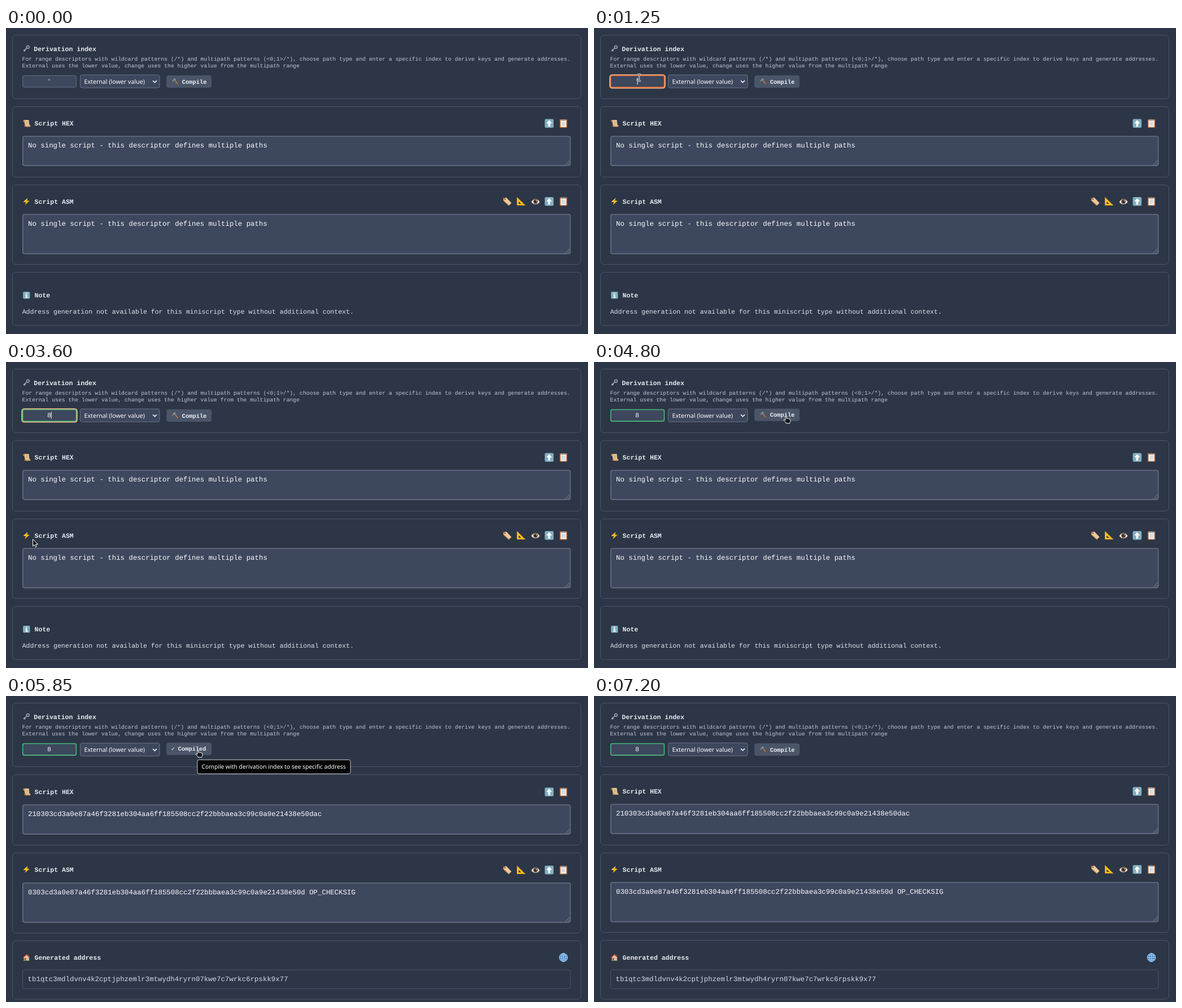
Recreate the animation shown at these times as an HTML page. Size 1031 by 543 pixels, loop 7800 ms.

```html
<!DOCTYPE html>
<html lang="en">
<head>
<meta charset="utf-8">
<title>Derivation index</title>
<style>
html, body { margin: 0; width: 100%; height: 100%; overflow: hidden; background: #2c3646; }
svg.stage { display: block; width: 1031px; height: 543px; }
text { font-family: "Liberation Mono", monospace; text-rendering: geometricPrecision; white-space: pre; }
.panel { fill: none; stroke: #4a5568; }
.area { fill: #3d475d; stroke: #667084; stroke-width: 1.6; }
.title { font-size: 11.53px; font-weight: bold; fill: #e6ebf1; }
.hint { font-size: 9.75px; fill: #bcc7d5; }
.code { font-size: 12.4px; fill: #fbfcfe; }
.note { font-size: 11.53px; fill: #dde4ec; }
.btn { font-size: 10.4px; font-weight: bold; fill: #eef2f7; }
.sans { font-family: "Noto Sans", "Open Sans", sans-serif; fill: #fff; }
.grip { fill: none; stroke: #8e98a8; stroke-width: .8; }
</style>
</head>
<body>
<svg class="stage" viewBox="0 0 1031 543">
<defs>
  <symbol id="key" viewBox="0 0 16 16" fill="none" stroke="#aab7c1">
    <circle cx="11.5" cy="4.6" r="3" stroke-width="1.6"/>
    <path d="M9.2 6.8 2 13.6M2.2 10.8l3.3 3.4M4.3 9.4l2.4 2.4" stroke-width="1.5"/>
  </symbol>
  <symbol id="hammer" viewBox="0 0 16 16">
    <path d="M6 5.5 8 3.8 15.4 13.3 13.4 15z" fill="#b5703f"/>
    <path d="M1 7.4 7.2.8 10.4 3.6 8.3 6 6.6 5 3.2 9.4z" fill="#82909a"/>
    <path d="M1 7.4 3.2 9.4 4.2 8.1 2 6.2z" fill="#566670"/>
  </symbol>
  <symbol id="scroll" viewBox="0 0 16 16">
    <path d="M2.2 1h10.2l1.3 11.5H4.6z" fill="#f2cf9f"/>
    <path d="M2.4 1a2 2 0 0 0-.4 4h2L4.3 2.5z" fill="#c98f59"/>
    <path d="M4.2 11.5h10.3a1.8 1.8 0 0 1 0 3.6H5.4z" fill="#ddb07a"/>
    <circle cx="4.6" cy="13.3" r="1.8" fill="#b97f4b"/>
    <path d="M5.4 4.2h6M5.7 6.5h6M6 8.8h6" stroke="#b58655" stroke-width=".9"/>
  </symbol>
  <symbol id="bolt" viewBox="0 0 16 16">
    <path d="M10.8.6 1.5 9l5.2.4L4.6 15.4 14.5 6.8 9 6.2z" fill="#fcb911"/>
    <path d="M10.8.6 1.5 9l1.6.1z" fill="#ffdf68"/>
  </symbol>
  <symbol id="up" viewBox="0 0 16 16">
    <rect x=".4" y=".4" width="15.2" height="15.2" rx="2.2" fill="#82aec0"/>
    <path d="M8 2.2 13 8H9.8v5.6H6.2V8H3z" fill="#fafcfd"/>
  </symbol>
  <symbol id="info" viewBox="0 0 16 16">
    <rect x=".4" y=".4" width="15.2" height="15.2" rx="2.2" fill="#82aec0"/>
    <circle cx="8" cy="3.8" r="1.5" fill="#fff"/>
    <path d="M5.8 6.4h3.5v5.4h1.5v1.7H5.4v-1.7h1.5V8.1H5.8z" fill="#fff"/>
  </symbol>
  <symbol id="clip" viewBox="0 0 16 16">
    <rect x="1.8" y="1.4" width="12.4" height="14.2" rx="1.3" fill="#bd7549"/>
    <path d="M3.4 3.2h9.2v11H3.4z" fill="#f6f7f8"/>
    <path d="M5 3.9V2.2h1.6a1.5 1.5 0 0 1 2.8 0H11v1.7z" fill="#8f9ea7"/>
    <path d="M5 6.7h6M5 8.9h6M5 11.1h6" stroke="#a9b4bb" stroke-width=".9"/>
  </symbol>
  <symbol id="tag" viewBox="0 0 16 16">
    <path d="M1.6 3.2 6.2 1.6 15 10.8 10.4 15.2 1.5 7z" fill="#f0c999"/>
    <path d="M1.5 7 10.4 15.2 11.4 14.2 2 5.8z" fill="#cf9a62"/>
    <circle cx="4.1" cy="4.5" r="1.1" fill="#6d4a35"/>
    <path d="M4.1 4.5C2 3.8.6 2.4 1.4 1.2" fill="none" stroke="#d94f3d" stroke-width=".9"/>
  </symbol>
  <symbol id="ruler" viewBox="0 0 16 16">
    <path d="M1 1v14h14.4zM4 8.2 8.3 12.3H4z" fill="#fcc21b" fill-rule="evenodd"/>
    <path d="M1 15h14.4l-1-1H1z" fill="#e0931b"/>
    <path d="M3.2 3.2 2.3 4M5.4 5.3l-.9.8M7.6 7.4l-.9.8M9.8 9.6l-.9.8M12 11.7l-.9.8" stroke="#8a6516" stroke-width=".7"/>
  </symbol>
  <symbol id="eye" viewBox="0 0 16 16">
    <path d="M.6 8.4Q3.8 3.4 8 3.4T15.4 8.4Q12 12.8 8 12.8T.6 8.4z" fill="#fafafa" stroke="#55504d" stroke-width=".7"/>
    <path d="M.6 8.2Q3.8 3.2 8 3.2T15.4 8.2" fill="none" stroke="#4b4542" stroke-width="1.2"/>
    <circle cx="8" cy="8" r="3.9" fill="#7b5a4a"/>
    <circle cx="8" cy="8" r="2.1" fill="#1f1b1a"/>
    <circle cx="9.2" cy="6.8" r=".8" fill="#fff"/>
  </symbol>
  <symbol id="house" viewBox="0 0 16 16">
    <path d="M2.6 7.5 8 2.6l5.4 4.9v7.2H2.6z" fill="#f2c9a0"/>
    <path d="M11 2h1.9v4H11z" fill="#a6533c"/>
    <path d="M.6 8.6 8 1.2l7.4 7.4-1 1L8 3.8 1.6 9.6z" fill="#e0533d"/>
    <path d="M3.9 9.2h3.2v5.5H3.9z" fill="#8b5138"/>
    <path d="M8.7 9h3.4v3H8.7z" fill="#7fc2e8"/>
    <path d="M1.6 14.2h12.8v1H1.6z" fill="#76a33f"/>
  </symbol>
  <symbol id="globe" viewBox="0 0 16 16">
    <circle cx="8" cy="8" r="7.4" fill="#3f7fc4"/>
    <g fill="none" stroke="#b5d9f5" stroke-width=".9">
      <circle cx="8" cy="8" r="7"/><ellipse cx="8" cy="8" rx="3.4" ry="7"/>
      <path d="M8 1v14M1 8h14M2.2 4.4h11.6M2.2 11.6h11.6"/>
    </g>
  </symbol>
  <g id="grip"><path class="grip" d="M0 8 8 0M4 8 8 4"/></g>
</defs>

<rect width="1031" height="543" fill="#2c3646"/>

<rect class="panel" x="11.5" y="12.5" width="1007" height="113" rx="6"/>
<use href="#key" x="29.5" y="30" width="13" height="13"/>
<text class="title" x="49.3" y="40.7">Derivation index</text>
<text class="hint" x="28.6" y="57.9">For range descriptors with wildcard patterns (/*) and multipath patterns (&lt;0;1&gt;/*), choose path type and enter a specific index to derive keys and generate addresses.</text>
<text class="hint" x="28.6" y="70.4">External uses the lower value, change uses the higher value from the multipath range</text>

<rect id="ring" x="28.2" y="83.2" width="97.6" height="23.4" rx="4" fill="none" stroke="#f7b58c" stroke-width="2"/>
<rect id="field" x="29.7" y="84.5" width="94.7" height="20.6" rx="2.5" fill="#3d475d"/>
<text id="star" class="note" x="76.5" y="98" text-anchor="middle" style="fill:#a3aebd">*</text>
<text id="digit" class="code" x="76.5" y="97.8" text-anchor="middle" style="font-size:11.53px">8</text>
<rect id="caret" y="88.5" width="1" height="12" fill="#fff"/>

<g data-shift=".5">
  <rect x="131.5" y="83.2" width="140.6" height="23" rx="3" fill="#3d475d" stroke="#6a7487"/>
  <text class="sans" x="138.5" y="98.7" font-size="10.65">External (lower value)</text>
  <path d="M260.2 93.4l3.4 3.4 3.4-3.4" fill="none" stroke="#fff" stroke-width="1.5"/>
</g>

<g id="button">
  <rect x="284.2" y="84" width="80" height="22" rx="4" fill="#4a5568"/>
  <g id="idle">
    <use href="#hammer" x="293" y="88.4" width="12.5" height="12.5"/>
    <text class="btn" x="311.8" y="98.8">Compile</text>
  </g>
  <g id="done">
    <text class="btn" x="292" y="98.8" style="font:9.5px 'DejaVu Sans',sans-serif">✓</text>
    <text class="btn" x="304.7" y="98.8">Compiled</text>
  </g>
</g>

<rect class="panel" x="11.5" y="139.5" width="1007" height="125" rx="6"/>
<g data-shift="1">
  <use href="#scroll" x="30" y="162.5" width="13.5" height="13.5"/>
  <text class="title" x="50.6" y="173.3">Script HEX</text>
  <use href="#up" x="954" y="161" width="16.5" height="16.5"/>
  <use href="#clip" x="979" y="160.5" width="17" height="17"/>
  <rect class="area" x="29.8" y="192.3" width="969.8" height="51.8" rx="3"/>
  <use href="#grip" x="990.5" y="235"/>
  <text id="hex" class="code" x="39" y="212.4"></text>
</g>

<rect id="asmPanel" class="panel" x="11.5" y="278.5" width="1007" height="141" rx="6"/>
<use href="#bolt" x="29.5" y="301" width="13.5" height="13.5"/>
<text class="title" x="50.6" y="311.9">Script ASM</text>
<g data-shift="1">
  <use href="#tag" x="879.5" y="299" width="17" height="17"/>
  <use href="#ruler" x="904" y="299" width="17" height="17"/>
  <use href="#eye" x="929.5" y="299.5" width="17" height="17"/>
  <use href="#up" x="954" y="299.5" width="16.5" height="16.5"/>
  <use href="#clip" x="979" y="299" width="17" height="17"/>
  <rect class="area" x="29.8" y="330.8" width="969.8" height="69.8" rx="3"/>
  <use href="#grip" x="990.5" y="391.5"/>
  <text id="asm" class="code" x="39" y="351"></text>
</g>

<rect id="lastPanel" class="panel" x="11.5" width="1007" rx="6"/>
<g id="noteBox">
  <use href="#info" x="29.8" y="467.8" width="13" height="13"/>
  <text class="title" x="50.6" y="478.4">Note</text>
  <text class="note" x="28.7" y="506.6">Address generation not available for this miniscript type without additional context.</text>
</g>
<g id="addressBox">
  <use href="#house" x="29.5" y="457" width="13.5" height="13.5"/>
  <text class="title" x="50.6" y="467.9">Generated address</text>
  <use href="#globe" x="979.2" y="455.7" width="16.6" height="16.6"/>
  <rect class="panel" x="29.5" y="486" width="970.3" height="33.4" rx="3"/>
  <text class="code" x="38.6" y="505.8" style="fill:#d3dbe5">tb1qtc3mdldvnv4k2cptjphzemlr3mtwydh4ryrn07kwe7c7wrkc6rpskk9x77</text>
</g>

<g id="tip">
  <rect x="339" y="113.2" width="271.2" height="24.8" rx="3" fill="#050506" stroke="#c9cdd3"/>
  <text class="sans" x="346.6" y="129.2" font-size="10.3">Compile with derivation index to see specific address</text>
</g>

<g id="pointer" stroke-linejoin="round">
  <path id="arrow" d="M0 0v12.3l2.8-2.6 2 4.4 2.1-1-2-4.2h4z" fill="#14171c" stroke="#fff"/>
  <g id="beam" fill="none">
    <path d="M-3-6h2q1 0 1 1 0-1 1-1h2M0-5V5M-3 6h2q1 0 1-1 0 1 1 1h2" stroke="#f4f6f8" stroke-width="2.4"/>
    <path d="M-3-6h2q1 0 1 1 0-1 1-1h2M0-5V5M-3 6h2q1 0 1-1 0 1 1 1h2" stroke="#20242b" stroke-width=".9"/>
  </g>
  <path id="hand" d="M-1 0Q0-1 1 0V4.2Q3 3.6 3.6 4.6 5 4.1 5.8 5.1 7.8 4.8 8 6.2V9Q8 10.8 6.8 11.6V12.8H0V11.6L-3.6 8Q-4.3 6.6-2.8 6.3L-1 7.4z" fill="#14171c" stroke="#fff"/>
</g>
</svg>

<script>
const LOOP = 7800, STEP = 50;
const $ = id => document.getElementById(id);
const show = (id, on) => $(id).style.display = on ? '' : 'none';
const within = (t, ...spans) => spans.some(([a, b]) => t >= a && t < b);
const set = (id, attrs) => { for (const k in attrs) $(id).setAttribute(k, attrs[k]); };

const KEY = '0303cd3a0e87a46f3281eb304aa6ff185508cc2f22bbbaea3c99c0a9e21438e50d';
const EMPTY = 'No single script - this descriptor defines multiple paths';

const linear = p => p;
const easeIn = p => p * p;
const easeOut = p => 1 - (1 - p) ** 2;
const easeInOut = p => p * p * (3 - 2 * p);

// start, end, from, to, easing
const moves = [
  [50, 300, [262, 372], [149, 191.5], linear],
  [300, 750, [149, 191.5], [80, 90], easeOut],
  [750, 850, [80, 90], [80, 88], linear],
  [850, 2400, [80, 88], [80, 88], linear],
  [3600, 4350, [47.5, 314.5], [340, 96], easeInOut],
  [4350, 6200, [340, 96], [340, 96], linear],
  [6200, 6550, [340, 96], [352, 8], easeIn]
];

function pointerAt(t) {
  const m = moves.find(([a, b]) => t >= a && t < b);
  if (!m) return null;
  const [a, b, from, to, ease] = m, p = ease((t - a) / (b - a));
  return from.map((v, i) => v + (to[i] - v) * p);
}

const boxes = {
  beam: [[29, 84, 125, 106], [29, 191, 1000, 245], [29, 330, 1000, 401]],
  hand: [[284, 83, 365, 106]]
};
function shapeAt([x, y]) {
  for (const name in boxes)
    if (boxes[name].some(([l, t, r, b]) => x >= l && x <= r && y >= t && y <= b)) return name;
  return 'arrow';
}

function draw(now) {
  const t = Math.floor(now % LOOP / STEP) * STEP;
  const typed = t >= 2400, valid = t >= 3050, compiled = t >= 4850;
  const focus = within(t, [1250, 4650]), flash = within(t, [4850, 5950]);

  const pos = pointerAt(t), shape = pos && shapeAt(pos);
  show('pointer', pos);
  if (pos) set('pointer', { transform: `translate(${pos})` });
  for (const id of ['arrow', 'beam', 'hand']) show(id, shape === id);

  show('ring', focus);
  set('field', {
    stroke: valid ? '#48bb78' : focus ? '#dd6b36' : '#667084',
    'stroke-width': valid || focus ? 1.6 : 1
  });
  show('star', !typed);
  show('digit', typed);
  show('caret', within(t, [1250, 2000], [2400, 2600], [3050, 3650], [4150, 4650]));
  set('caret', { x: typed ? 79.7 : 76.5 });

  const hover = shape === 'hand';
  const pressed = within(t, [4650, 4750]);
  set('button', { transform: `translate(0 ${hover && !pressed ? -1.3 : 0})` });
  show('idle', !flash);
  show('done', flash);
  const tip = t >= 5350 && hover;
  show('tip', tip);
  $('tip').style.opacity = t < 5400 ? .5 : 1;

  $('hex').textContent = compiled ? `21${KEY}ac` : EMPTY;
  $('asm').textContent = compiled ? `${KEY} OP_CHECKSIG` : EMPTY;
  show('noteBox', !compiled);
  show('addressBox', compiled);

  // the taller "Compiled" label nudges the layout down
  const nudge = flash ? 1 : 0;
  for (const el of document.querySelectorAll('[data-shift]'))
    el.setAttribute('transform', `translate(0 ${nudge * el.dataset.shift})`);
  set('asmPanel', { height: 141 + nudge });
  set('lastPanel', { y: 433.5 + nudge, height: (compiled ? 104.5 : 94.5) - nudge });
}

function tick() {
  draw(performance.now());
  requestAnimationFrame(tick);
}
tick();
</script>
</body>
</html>
```
